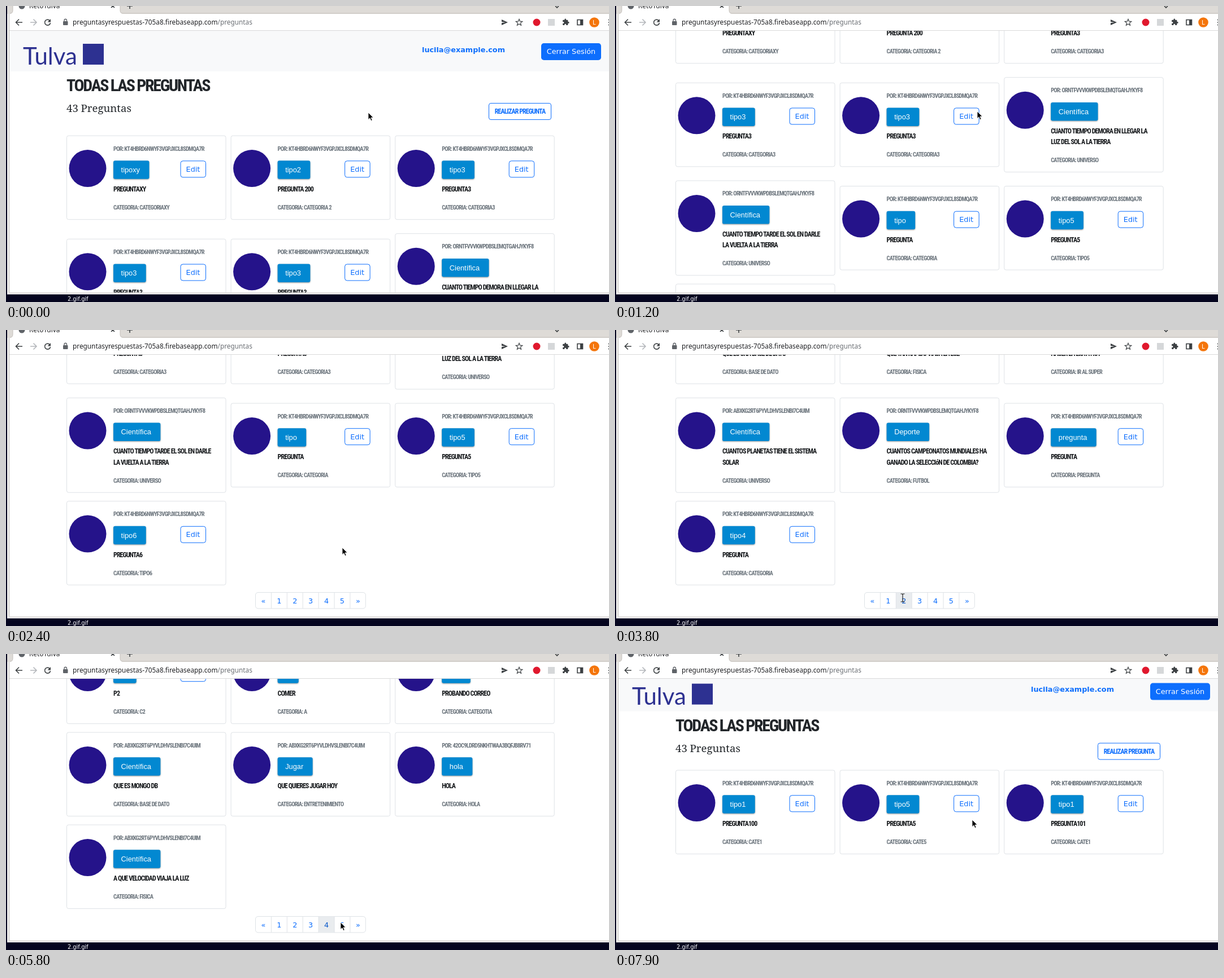
Write an HTML page that moves like this. It is 1067 px wide and 525 px high and loops after 8000 ms.

```html
<!DOCTYPE html>
<html lang="es">
<head>
<meta charset="utf-8">
<title>Todas las preguntas</title>
<style>
  html, body { margin: 0; width: 100%; height: 100%; overflow: hidden; background: #fff; }
  svg { display: block; }
  text { white-space: pre; }
  .ui { font: 12.8px "DejaVu Sans", sans-serif; }
  .chrome { font: 11.8px "Noto Sans", sans-serif; fill: #202124; }
  .chip { font: 12.8px "Liberation Sans", Arial, sans-serif; fill: #fff; }
  .narrow {
    font-family: var(--family), sans-serif; font-weight: 700; font-stretch: extra-condensed;
    font-size: calc(var(--size) * var(--scale)); letter-spacing: var(--track);
  }
  .h1 { --size: 32px; fill: #212529; }
  .title { --size: 12.8px; fill: #16191c; }
  .muted { --size: 11.2px; fill: #6c757d; }
  .link { fill: #0d6efd; }
  .mid { text-anchor: middle; }
  .outline { fill: #fff; stroke: #0d6efd; }
  .box { fill: #fff; stroke: #dee2e6; }
  .raised { fill: #0288d1; filter: drop-shadow(0 1px 1px #0006); }
  .icon { fill: none; stroke: #3c4043; stroke-width: 1.6; }
</style>
</head>
<body>
<svg id="stage" width="1067" height="525" viewBox="0 0 1067 525">
  <defs><clipPath id="view"><rect x="6" y="44" width="1061" height="464"/></clipPath></defs>
  <rect width="1067" height="525" fill="#05051f"/>
  <rect x="2" width="1065" height="511.5" fill="#f3f2f1"/>
  <rect x="5" width="1062" height="508.5" fill="#b9b6b2"/>
  <rect x="6" y="14" width="1061" height="494" fill="#fff"/>

  <g clip-path="url(#view)">
    <g id="doc">
      <rect x="6" y="30" width="1061" height="86" fill="#f8f9fa"/>
      <text x="30" y="104" font-family="Lato, sans-serif" font-size="42" fill="#2d3191">Tulva</text>
      <rect x="136" y="67" width="37" height="37" fill="#2d3191"/>
      <text class="ui link" x="736" y="81.500" font-weight="700" style="font-weight:700">lucila@example.com</text>
      <rect x="947" y="66" width="106" height="30" rx="4.8" fill="#0d6efd"/>
      <text class="ui mid" x="1000" y="85" fill="#fff">Cerrar Sesión</text>
      <text class="narrow h1" x="107" y="151">TODAS LAS PREGUNTAS</text>
      <text x="107" y="188" font-family="Noto Serif, serif" font-size="18.6" fill="#212529">43 Preguntas</text>
      <rect class="outline" x="854.500" y="172.500" width="110" height="29" rx="3.500"/>
      <text class="narrow title link mid" style="fill:#0d6efd" x="909.500" y="191">REALIZAR PREGUNTA</text>
      <g id="page"></g>
    </g>
  </g>

  <rect x="2" width="1065" height="14" fill="#dedbd7"/>
  <path d="M6 14Q12 14 12 8V0H202V8Q202 14 208 14Z" fill="#fff"/>
  <path d="M12 0V8Q12 13 7 13M202 0V8Q202 13 207 13H1067" fill="none" stroke="#c4c0bb"/>
  <path d="M6 43.500H1067" stroke="#d9d9d9"/>
  <circle cx="28" cy="0" r="5.500" fill="#5f6368"/>
  <text class="chrome" x="41" y="4">RetoTulva</text>
  <path class="icon" d="M186 -3L192 3M186 3L192 -3M214 0H224M219 -5V5M972 0L975 3L978 0"/>
  <path class="icon" d="M29 29H18M23 23.500L17.500 29L23 34.500"/>
  <path class="icon" style="stroke:#b4b7bb" d="M43 29H54M48.500 23.500L54 29L48.500 34.500"/>
  <path class="icon" d="M77 25.500A5 5 0 1 0 78.500 30"/>
  <path d="M79 23V28.500H73.500Z" fill="#3c4043"/>
  <rect x="101" y="27" width="8.500" height="7" rx="1" fill="#5f6368"/>
  <path class="icon" style="stroke:#5f6368;stroke-width:1.3" d="M103 27V25.500A2.200 2.200 0 0 1 107.500 25.500V27"/>
  <text class="chrome" x="118" y="33">preguntasyrespuestas-705a8.firebaseapp.com<tspan fill="#6b6f74">/preguntas</tspan></text>
  <path d="M877 24L888 29L877 34V30L884 29L877 28Z" fill="#3c4043"/>
  <path id="star" class="icon" style="stroke-width:1.2"/>
  <circle cx="939" cy="29" r="6.500" fill="#e0182d"/>
  <rect x="959" y="23" width="12" height="12" fill="#d5d7d9"/>
  <path transform="translate(984 22) scale(.55)" fill="#3c4043" d="M20.500 11H19V7a2 2 0 0 0-2-2h-4V3.500a2.500 2.500 0 0 0-5 0V5H4a2 2 0 0 0-2 2v3.800h1.500a2.700 2.700 0 0 1 0 5.400H2V20a2 2 0 0 0 2 2h3.800v-1.500a2.700 2.700 0 0 1 5.400 0V22H17a2 2 0 0 0 2-2v-4h1.500a2.500 2.500 0 0 0 0-5z"/>
  <rect class="icon" x="1011" y="24.500" width="9.500" height="9"/>
  <rect x="1016" y="24" width="5" height="10" fill="#3c4043"/>
  <circle cx="1041" cy="29" r="8.800" fill="#f4750b"/>
  <text class="chrome mid" x="1041" y="33" style="fill:#fff;font-size:11px">L</text>
  <path d="M1066 23.500h2v2h-2zM1066 28h2v2h-2zM1066 32.500h2v2h-2z" fill="#3c4043"/>
  <text class="ui" x="109" y="523" fill="#fff" style="font-size:9.800px">2.gif.gif</text>

  <path id="arrow" d="M0 0V12.500L2.900 9.800L5 14.600L7.100 13.600L5 9H9Z" fill="#000" stroke="#fff" stroke-width=".8"/>
  <path id="ibeam" d="M-3.500 -7H-1L0 -6L1 -7H3.500M0 -6V6M-3.500 7H-1L0 6L1 7H3.500" fill="none" stroke="#222" stroke-width="1.200"/>
</svg>
<script>
const $ = id => document.getElementById(id);
const ctx = document.createElement('canvas').getContext('2d');
const measure = (font, text) => {
  ctx.font = font;
  return ctx.measureText(text).width;
};

// Choose the narrowest available face for the display lettering and set its tracking.
function chooseNarrowFace() {
  const sample = 'CUANTO TIEMPO DEMORA EN LLEGAR LA', advance = 0.405;
  const faces = ['Noto Sans', 'Open Sans', 'Roboto', 'Roboto Condensed'].map(family => ({
    family,
    width: measure(`bold extra-condensed 100px "${family}", sans-serif`, sample) / 100 / sample.length
  }));
  const face = faces.reduce((a, b) => b.width < a.width ? b : a);
  const track = Math.max(-0.075, Math.min(0, advance - face.width));
  const style = $('stage').style;
  style.setProperty('--family', `"${face.family}"`);
  style.setProperty('--track', `${track}em`);
  style.setProperty('--scale', Math.min(1.05, advance / (face.width + track)));
}

const authors = {
  K: 'KT4HBRD6NWYF3VGPJXCL8SDMQA7R',
  O: 'ORNTFVVVKWPDBSLEMQTGAHJYKYF8',
  A: 'ABXKG2RT6PYVLDHVSLENBI7C4UIM',
  N: '42OC9LDRD5NKHTWAA3BQFJB8RV71'
};

// Cards: author|type|title (slash = line break)|category. "first" is the grid cell of the first card.
const pages = [
  { first: 0, slot: 168.8, end: 466.5, cards: [
    'K|tipoxy|PREGUNTAXY|CATEGORIAXY', 'K|tipo2|PREGUNTA 200|CATEGORIA 2', 'K|tipo3|PREGUNTA3|CATEGORIA3',
    'K|tipo3|PREGUNTA3|CATEGORIA3', 'K|tipo3|PREGUNTA3|CATEGORIA3',
    'O|Científica|CUANTO TIEMPO DEMORA EN LLEGAR LA/LUZ DEL SOL A LA TIERRA|UNIVERSO',
    'O|Científica|CUANTO TIEMPO TARDE EL SOL EN DARLE/LA VUELTA A LA TIERRA|UNIVERSO',
    'K|tipo|PREGUNTA|CATEGORIA', 'K|tipo5|PREGUNTA5|TIPO5', 'K|tipo6|PREGUNTA6|TIPO6'] },
  { first: 3, slot: 168.8, end: 466.5, cards: [
    'A|Científica|QUE ES UNA BASE DE DATO|BASE DE DATO', 'A|Científica|QUE TAN RAPIDO VIAJA LA LUZ|FISICA',
    'A|Compras|HACER LA LISTA HOY|IR AL SUPER',
    'A|Científica|CUANTOS PLANETAS TIENE EL SISTEMA/SOLAR|UNIVERSO',
    'O|Deporte|CUANTOS CAMPEONATOS MUNDIALES HA/GANADO LA SELECCIóN DE COLOMBIA?|FUTBOL',
    'K|pregunta|PREGUNTA|PREGUNTA', 'K|tipo4|PREGUNTA|CATEGORIA'] },
  { first: 3, slot: 168.8, end: 466.5, cards: [
    'K|tipo1|PREGUNTA1|CATEGORIA1', 'K|tipo2|PREGUNTA2|CATEGORIA2', 'A|Científica|QUE ES UN PLANETA|UNIVERSO',
    'K|tipo|PREGUNTA|CATEGORIA', 'A|Científica|CUANTO TIEMPO TARDA LA LUNA EN/DAR LA VUELTA|UNIVERSO',
    'K|tipo3|PREGUNTA3|CATEGORIA3', 'K|tipo1|PREGUNTA1|CATEGORIA1'] },
  { first: 3, slot: 149.6, end: 409.5, cards: [
    'K|t2|P2|C2', 'A|a|COMER|A', 'N|tipo|PROBANDO CORREO|CATEGOTIA',
    'A|Científica|QUE ES MONGO DB|BASE DE DATO', 'A|Jugar|QUE QUIERES JUGAR HOY|ENTRETENIMIENTO',
    'N|hola|HOLA|HOLA', 'A|Científica|A QUE VELOCIDAD VIAJA LA LUZ|FISICA'] },
  { first: 0, slot: 149.6, end: 246, cards: [
    'K|tipo1|PREGUNTA100|CATE1', 'K|tipo5|PREGUNTA5|CATE5', 'K|tipo1|PREGUNTA101|CATE1'] }
];

const rect = (cls, x, y, w, h, r) => `<rect class="${cls}" x="${x}" y="${y}" width="${w}" height="${h}" rx="${r}"/>`;
const text = (cls, x, y, str) => `<text class="${cls}" x="${x}" y="${y}">${str}</text>`;

function card(data, cell, slot) {
  const [author, type, title, category] = data.split('|');
  const lines = title.split('/');
  const extra = (lines.length - 1) * 19.2;
  const height = 149.6 + extra;
  const row = Math.floor(cell / 3);
  const x = 107 + cell % 3 * 290.6;
  const y = 220 + row * (slot + 14.4) + (row === 3 ? 0 : (slot - height) / 2);
  const chipWidth = measure('12.8px "Liberation Sans", Arial, sans-serif', type) + 30;
  return `<g transform="translate(${x} ${y})">
    ${rect('box', .5, .5, 281.5, height - 1, 3.2)}
    <circle cx="37.5" cy="58.5" r="33" fill="#25138a"/>
    ${text('narrow muted', 83, 27, 'POR: ' + authors[author])}
    ${rect('raised', 83, 44.7, chipWidth, 32.5, 3.2)}
    ${text('chip', 96.6, 65.5, type)}
    ${author === 'K' ? rect('outline', 202, 45.2, 44.5, 29, 4) + text('ui link mid', 224, 64, 'Edit') : ''}
    ${lines.map((line, i) => text('narrow title', 83, 99.5 + i * 19.2, line)).join('')}
    ${text('narrow muted', 83, 131.5 + extra, 'CATEGORIA: ' + category)}
  </g>`;
}

function pagination(y, active) {
  const step = 27.9;
  const items = ['«', 1, 2, 3, 4, 5, '»'].map((label, i) => {
    const x = 441.5 + i * step, on = label === active;
    return (on ? `<rect x="${x}" y="${y}" width="${step}" height="28.5" fill="#e9ecef"/>` : '') +
      (i ? `<path d="M${x} ${y}v28.5" stroke="#dee2e6"/>` : '') +
      `<text class="ui mid" x="${x + step / 2}" y="${y + 19}" fill="${on ? '#0a58ca' : '#0d6efd'}">${label}</text>`;
  });
  return rect('box', 441.5, y, 7 * step - .5, 28.5, 4.5) + items.join('');
}

// Keys are [time, ...values]; values run linearly between keys.
const scrollKeys = [[0, 0], [900, 0], [1000, 60], [1100, 190], [1200, 277], [1400, 277], [1500, 400], [1600, 466.5],
  [5700, 466.5], [5800, 409.5], [6400, 409.5], [6500, 246], [7600, 246], [7700, 190], [7800, 85], [7900, 14.4]];
const cursorKeys = [[0, 641, 189], [100, 641, 187], [2100, 641, 187], [2400, 595, 386], [3100, 595, 386],
  [3600, 509, 475], [3800, 509, 475], [4200, 538, 476], [4300, 538, 476], [4700, 566, 476], [5700, 566, 476],
  [5800, 592, 476], [6000, 595, 475], [6100, 595, 475], [6300, 600, 477], [6400, 600, 477], [7000, 640, 330],
  [7300, 640, 330], [7600, 632, 294]];
const pageTimes = [0, 3800, 4400, 5800, 6500];

function at(keys, t) {
  const next = keys.findIndex(key => key[0] > t);
  if (next < 0) return keys[keys.length - 1].slice(1);
  const a = keys[next - 1], b = keys[next];
  const p = (t - a[0]) / (b[0] - a[0]);
  return a.slice(1).map((v, i) => v + (b[i + 1] - v) * p);
}

let shown = '';
function showPage(index, active) {
  const key = index + ':' + active;
  if (key === shown) return;
  shown = key;
  const { first, slot, end, cards } = pages[index];
  $('page').innerHTML = cards.map((data, i) => card(data, first + i, slot)).join('') + pagination(465.5 + end, active);
}

function render(time) {
  const t = Math.floor(time / 100) * 100;
  const index = pageTimes.filter(start => start <= t).length - 1;
  showPage(index, index && t < 7000 ? index + 1 : 0);
  $('doc').setAttribute('transform', `translate(0 ${-at(scrollKeys, t)[0]})`);
  const beam = t >= 3600 && t < 3900;
  const [x, y] = at(cursorKeys, t);
  for (const id of ['arrow', 'ibeam']) {
    $(id).setAttribute('transform', `translate(${x} ${y})`);
    $(id).style.display = (id === 'ibeam') === beam ? '' : 'none';
  }
}

const starPoints = Array.from({ length: 10 }, (_, i) => {
  const angle = i * Math.PI / 5, r = i % 2 ? 2.6 : 6;
  return `${908 + r * Math.sin(angle)} ${29.3 - r * Math.cos(angle)}`;
});
$('star').setAttribute('d', `M${starPoints.join('L')}Z`);
chooseNarrowFace();

const start = performance.now();
(function frame() {
  render((performance.now() - start) % 8000);
  requestAnimationFrame(frame);
})();
</script>
</body>
</html>
```
